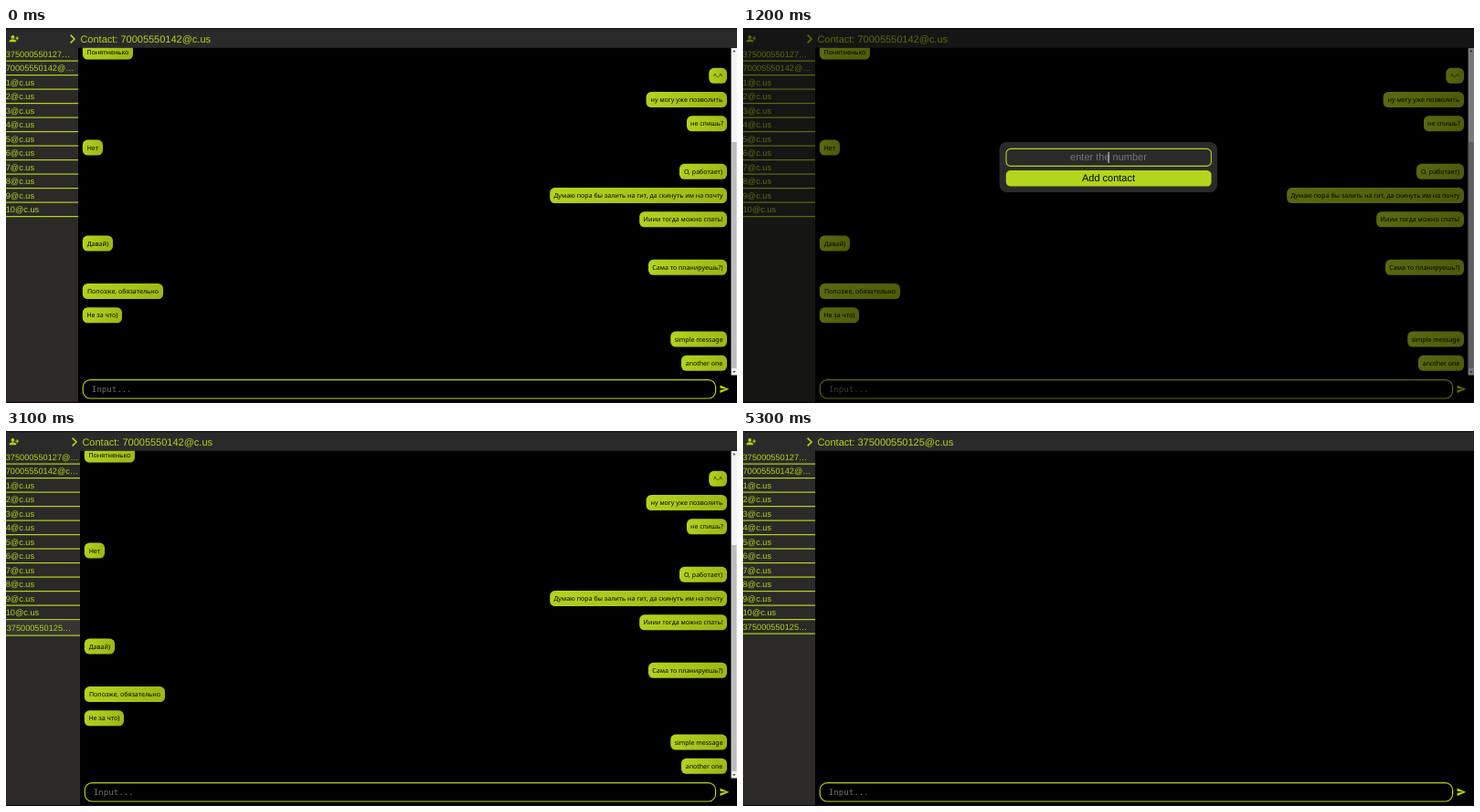
An HTML page for the animation above (5700 ms loop, 800x411 px).

```html
<!DOCTYPE html>
<html lang="ru">
<head>
<meta charset="utf-8">
<title>Chat</title>
<style>
html, body { margin: 0; width: 100%; height: 100%; overflow: hidden; background: #000; }
svg { display: block; width: 800px; height: 411px; text-rendering: geometricPrecision; }
text { white-space: pre; }
.ui { font-family: "Liberation Sans", Arial, sans-serif; }
.msg { font: 7px "Noto Sans", "Open Sans", sans-serif; text-anchor: middle; fill: #000; }
.mono { font: 9.1px "DejaVu Sans Mono", monospace; fill: #6f6f6f; }
.mid { font-size: 11px; text-anchor: middle; }
</style>
</head>
<body>
<svg id="stage" viewBox="0 0 800 411">
  <defs>
    <linearGradient id="bubble" x1="0" y1="0" x2="1" y2="0.15">
      <stop offset="0" stop-color="#b3d51f"/>
      <stop offset="1" stop-color="#9db914"/>
    </linearGradient>
  </defs>
  <rect width="800" height="411"/>
  <g id="chat">
    <g id="inbox"></g>
    <g id="outbox"></g>
    <rect x="793.6" y="22" width="6.4" height="358.5" fill="#f4f4f4"/>
    <rect x="794.2" y="125" width="5.4" height="248" fill="#bdbdbd"/>
    <path d="M795.2 26.2l1.7-2.2 1.7 2.2zM795.2 376l1.7 2.2 1.7-2.2z" fill="#555"/>
  </g>
  <rect id="side" y="21" width="79" height="390" fill="#2b2a28"/>
  <g id="list" class="ui" font-size="9.2" fill="#b4d51c"></g>
  <rect width="800" height="21.8" fill="#2b2a2b"/>
  <rect width="800" height="1.6" fill="#1f1820"/>
  <g fill="#b4d51c">
    <circle cx="7.4" cy="9.9" r="1.9"/>
    <path d="M3.7 15.2v-1c0-1.3 2.4-2 3.7-2s3.7.7 3.7 2v1z"/>
    <path d="M12.2 9.2v4M10.2 11.2h4" stroke="#b4d51c" stroke-width="1.1"/>
  </g>
  <g id="head">
    <path d="M70.6 7.6L75 12l-4.4 4.4" fill="none" stroke="#b4d51c" stroke-width="1.6"/>
    <text id="title" class="ui" x="81.4" y="16" font-size="11" fill="#b4d51c"></text>
  </g>
  <rect id="field" x="84.2" y="385.6" width="692.4" height="20.4" rx="8" stroke="#b4d51c" stroke-width="1.2"/>
  <text id="hint" class="mono" x="93.8" y="399">Input...</text>
  <path d="M781.5 391.5l9.8 4.3-9.8 4.3v-3.3l6.6-1-6.6-1z" fill="#b4d51c"/>
  <rect y="409.8" width="800" height="1.2" fill="#16081a"/>
  <rect id="shade" width="800" height="411" opacity="0"/>
  <g id="modal" class="ui">
    <rect x="280.6" y="125" width="238.4" height="55" rx="8" fill="#2b2a2b"/>
    <rect id="glow" x="288" y="132.4" width="224.4" height="19" rx="5" fill="none" stroke="#b4d51c" stroke-opacity=".55" stroke-width="2.8"/>
    <rect x="288" y="132.4" width="224.4" height="19" rx="5" fill="none" stroke="#b4d51c" stroke-width="1.1"/>
    <text id="number" class="mid" x="400" y="145.4"></text>
    <rect id="caret" x="399.7" y="136" width="0.8" height="12" fill="#fff"/>
    <rect id="button" x="287.8" y="156" width="224.8" height="17.6" rx="5"/>
    <text class="mid" x="400" y="168.2">Add contact</text>
  </g>
</svg>
<script>
const LOOP = 5700, STEP = 100, ROW = 15.5, FONT = 9.2;
const ADDED = "375000550125", OPEN = "70005550142";
const $ = id => document.getElementById(id);

function add(parent, tag, attrs, text) {
  const el = document.createElementNS("http://www.w3.org/2000/svg", tag);
  set(el, attrs);
  if (text) el.textContent = text;
  parent.appendChild(el);
  return el;
}
function set(el, attrs) {
  for (const k in attrs) el.setAttribute(k, attrs[k]);
}
function show(el, on) {
  el.setAttribute("visibility", on ? "visible" : "hidden");
}
const ramp = (t, a, b) => Math.min(1, Math.max(0, (t - a) / (b - a)));
const ease = (t, a, b) => { const p = ramp(t, a, b); return p * p * (3 - 2 * p); };
const mix = (a, b, p) => a + (b - a) * p;
const grey = v => `rgb(${v},${v},${v})`;

// Messages: text, outer edge of the bubble, sent by me
const messages = [
  ["Понятненько", 139], ["^-^", 769.3, 1], ["ну могу уже позволить", 700.6, 1],
  ["не спишь?", 745, 1], ["Нет", 106], ["О, работает)", 737, 1],
  ["Думаю пора бы залить на гит, да скинуть им на почту", 595.2, 1],
  ["Ииии тогда можно спать!", 693.2, 1], ["Давай)", 117],
  ["Сама то планируешь?)", 703, 1], ["Попозже, обязательно", 172],
  ["Не за что)", 127], ["simple message", 727.3, 1], ["another one", 739, 1]
];
messages.forEach(([text, edge, mine], i) => {
  const box = $(mine ? "outbox" : "inbox");
  const y = 26.1 + 26.25 * i;
  const left = mine ? edge : 83.8, right = mine ? 789 : edge;
  add(box, "rect", { x: left, y: y - 8.5, width: right - left, height: 17, rx: 5.5, fill: "url(#bubble)" });
  add(box, "text", { class: "msg", x: (left + right) / 2, y: y + 2.6 }, text);
});

// Contact list
const names = ["375000550127", OPEN, 1, 2, 3, 4, 5, 6, 7, 8, 9, 10, ADDED].map(n => n + "@c.us");
const rows = names.map(name => {
  const g = add($("list"), "g", {});
  return {
    name, g,
    back: add(g, "rect", { x: 0 }),
    label: add(g, "text", {}),
    line: add(g, "rect", { x: 0, height: 1.2 })
  };
});
const em = { "@": 1.015, ".": 0.278, c: 0.5, s: 0.5, "…": 1 };
const textWidth = s => [...s].reduce((sum, ch) => sum + (em[ch] || 0.556), 0) * FONT;

function clip(s, room) {
  if (textWidth(s) <= room) return s;
  while (s && textWidth(s + "…") > room) s = s.slice(0, -1);
  return s + "…";
}

function drawList(width, hot, hover) {
  let top = 20.7;
  rows.forEach((row, i) => {
    const h = i === hot ? hover : 0;
    const height = ROW + 4 * h;
    set(row.back, { y: top, width, height, fill: `rgba(80,80,80,${0.6 * h})` });
    set(row.label, { x: 2 * h - 0.3, y: top + 10.9 + 2 * h });
    row.label.textContent = clip(row.name, width - 4 * h);
    set(row.line, { y: top + height - 0.7, width });
    top += height;
  });
}

function draw(time) {
  const t = Math.floor((time % LOOP) / STEP) * STEP;

  // The pointer brushes the list, later rests on the new contact
  const brush = 0.25 * ease(t, 50, 350) * (1 - ease(t, 350, 650));
  const leave = 0.9 * ease(t, 4000, 4600) + 0.1 * ease(t, 4800, 5300);
  const rest = ease(t, 2550, 3650) * (1 - leave);
  const shift = 4 * (brush + rest);
  set($("side"), { width: 79 + shift });
  drawList(79 + shift, t < 1000 ? 0 : 12, brush + rest);
  show(rows[12].g, t >= 2300);

  const move = `translate(${shift} 0)`;
  for (const id of ["head", "inbox", "hint"]) set($(id), { transform: move });
  set($("field"), { x: 84.2 + shift, width: 692.4 - shift });

  const switched = t >= 3800;
  show($("chat"), !switched);
  $("title").textContent = `Contact: ${switched ? ADDED : OPEN}@c.us`;

  // Dialog
  const dialog = t >= 700 && t < 2300;
  show($("modal"), dialog);
  set($("shade"), { opacity: dialog ? 0.5 * ease(t, 700, 1200) : 0 });
  const typed = ADDED.slice(0, Math.round(12 * ramp(t, 1200, 1800)));
  $("number").textContent = typed || "enter the number";
  set($("number"), { fill: typed ? "#fff" : grey(117) });
  set($("glow"), { opacity: ease(t, 1200, 1600) });
  set($("caret"), {
    x: 399.7 + typed.length * 0.556 * 11 / 2,
    opacity: t >= 1200 && t < 1900 ? 1 : 0
  });
  const press = ease(t, 1800, 2200);
  set($("button"), { fill: `rgb(${mix(178, 163, press)},${mix(213, 190, press)},${mix(28, 18, press)})` });
}

const start = performance.now();
function loop() {
  draw(performance.now() - start);
  requestAnimationFrame(loop);
}
loop();
</script>
</body>
</html>
```
